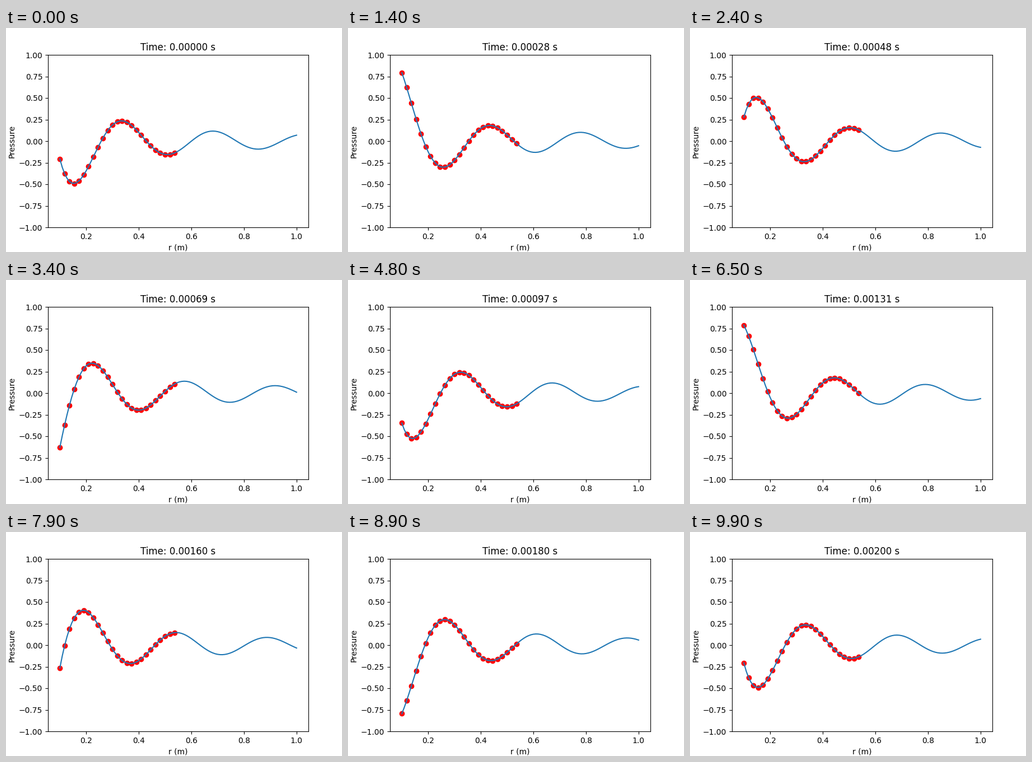
These frames come from a looping animation (600x400 px, 10 s). A matplotlib script:

```python
import numpy as np
import matplotlib.pyplot as plt
from matplotlib.animation import FuncAnimation

FRAMES = 100
FREQ = 1000.0   # Hz
SPEED = 343.0   # m/s
OMEGA = 2 * np.pi * FREQ
K = OMEGA / SPEED

r = np.linspace(0.1, 1.0, 100)
times = np.linspace(0, 0.002, FRAMES)
probes = r[:50:2]


def pressure(dist, t):
    """Outgoing spherical wave from a point source."""
    return np.cos(OMEGA * t - K * dist) / (4 * np.pi * dist)


fig, ax = plt.subplots(figsize=(6, 4), dpi=100)
line, = ax.plot(r, pressure(r, 0))
dots = ax.scatter(probes, pressure(probes, 0), color="red")
ax.set_xlim(0.055, 1.045)
ax.set_ylim(-1, 1)
ax.set_xlabel("r (m)")
ax.set_ylabel("Pressure")
title = ax.set_title("Time: 0.00000 s")


def update(i):
    t = times[i]
    line.set_ydata(pressure(r, t))
    dots.set_offsets(np.column_stack([probes, pressure(probes, t)]))
    title.set_text(f"Time: {t:.5f} s")
    return line, dots, title


anim = FuncAnimation(fig, update, frames=FRAMES, interval=100, repeat=True)
plt.show()
```
